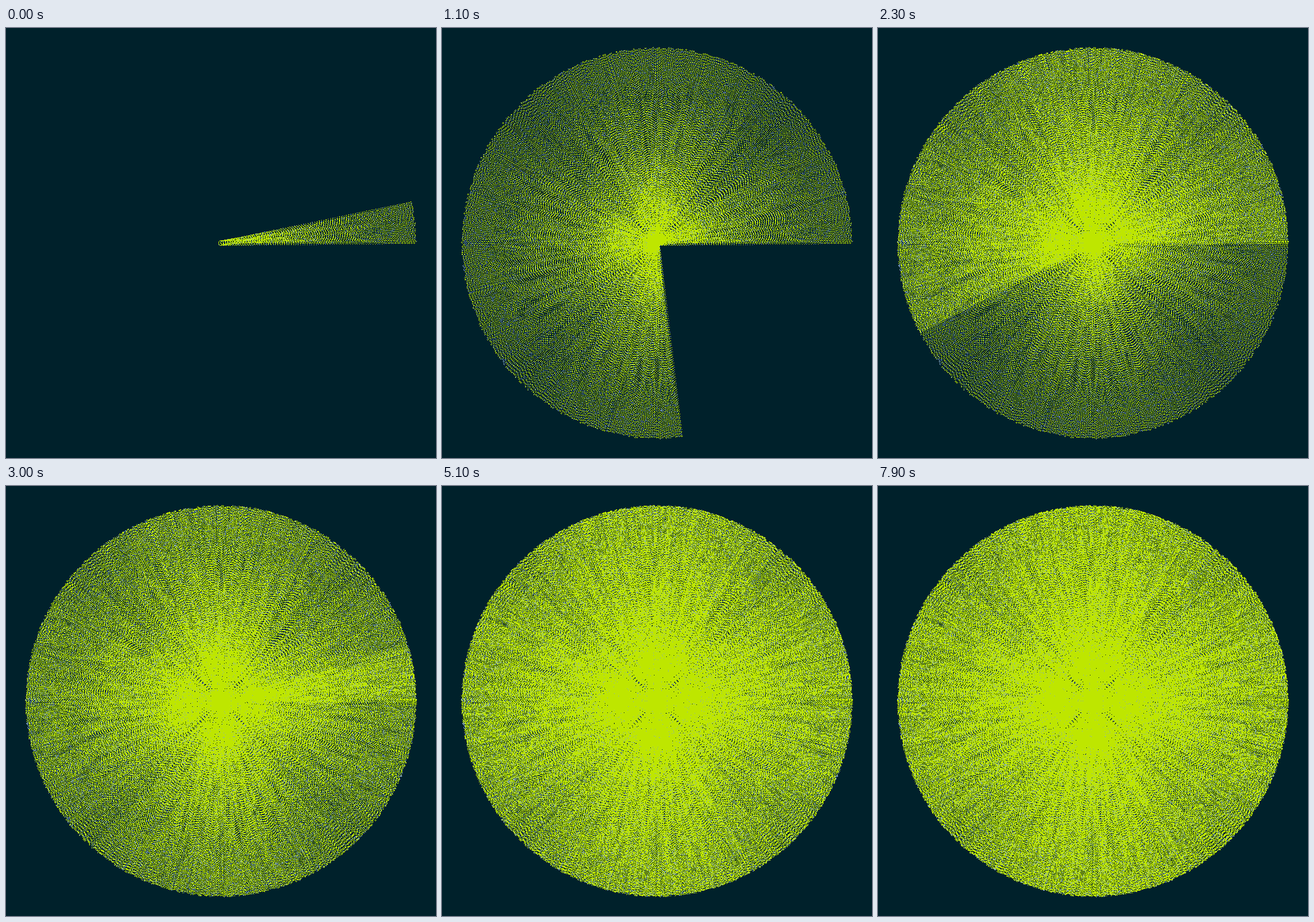
Recreate the animation shown at these times as an HTML page with a canvas. Size 700x699 px, loop 8 s.

```html
<!DOCTYPE html>
<html lang="en">
<head>
<meta charset="utf-8">
<title>Dotted sweep</title>
<style>
  html, body { margin: 0; width: 100%; height: 100%; overflow: hidden; background: #00212b; }
  canvas { display: block; }
</style>
</head>
<body>
<canvas id="stage" width="700" height="699"></canvas>
<script>
const W = 700, H = 699, CX = 350, CY = 349.5;
const LOOP = 8000, TICK = 100;
const STEP = 0.01;                 // radians between spokes
const FIRST = 21, RATE = 42.15;    // spokes at the start, spokes per tick
const REACH = 317.6;               // spoke length
const GAP = 3.6, SPREAD = 0.25;    // ring distance along the major axis, its variation
const CYCLE = 1885;                // spokes in three turns, after which they nearly repeat
const HUB = 4, TIP = 1;            // ring radius at centre and rim
const DOTS = 4, TWIST = 12;

const rgb = (r, g, b) => (255 << 24 | b << 16 | g << 8 | r) >>> 0;
const BACK = rgb(0, 33, 43), LIME = rgb(190, 230, 0), HAZE = rgb(130, 165, 200);

const ctx = document.getElementById('stage').getContext('2d');
const image = ctx.createImageData(W, H);
const pixels = new Uint32Array(image.data.buffer);
let drawn = 0, shown = -1;

// Repeatable pseudo-random value from 0 to 1.
function noise(n) {
  const v = Math.sin(n * 12.9898 + 4.1) * 43758.5453;
  return v - Math.floor(v);
}

function dot(x, y) {
  const px = Math.floor(x), py = Math.floor(y), i = py * W + px;
  // A dot close to a pixel corner only leaves a faint mark.
  const off = Math.abs(x - px - 0.5) + Math.abs(y - py - 0.5);
  if (off < 0.65) pixels[i] = LIME;
  else if (pixels[i] === BACK) pixels[i] = HAZE;
}

function spoke(n) {
  const a = n * STEP, cos = Math.cos(a), sin = Math.sin(a);
  const ring = [];
  for (let j = 0; j < DOTS; j++) {
    const p = a * TWIST + j * 2 * Math.PI / DOTS;
    ring.push([Math.cos(p), Math.sin(p)]);
  }
  const major = Math.max(Math.abs(cos), Math.abs(sin));
  const gap = (GAP + SPREAD * noise(n % CYCLE)) / major;
  for (let r = 0; r <= REACH; r += gap) {
    const size = HUB + (TIP - HUB) * r / REACH;
    const x = CX + r * cos, y = CY - r * sin;
    for (const [dx, dy] of ring) dot(x + size * dx, y - size * dy);
  }
}

function render(tick) {
  if (tick === shown) return;
  const count = Math.floor(FIRST + RATE * tick) + 1;
  if (shown < 0 || tick < shown) {
    pixels.fill(BACK);
    drawn = 0;
  }
  while (drawn < count) spoke(drawn++);
  shown = tick;
  ctx.putImageData(image, 0, 0);
}

const start = performance.now();
function frame() {
  render(Math.floor((performance.now() - start) % LOOP / TICK));
  requestAnimationFrame(frame);
}
frame();
</script>
</body>
</html>
```
